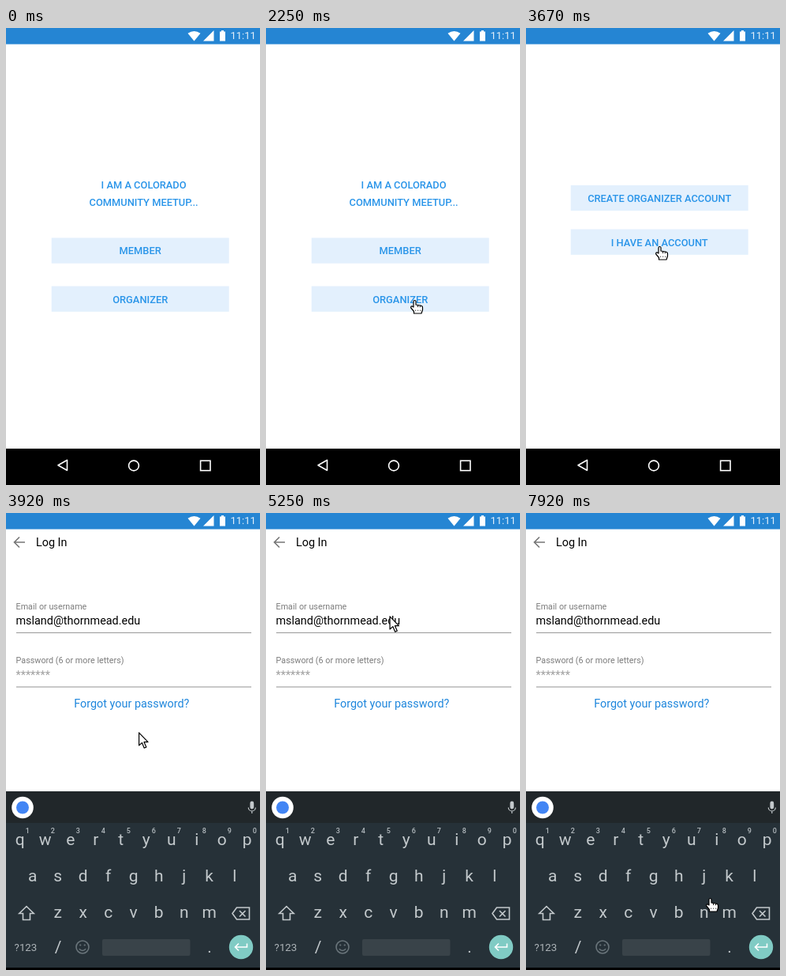
Write an HTML page that moves like this. It is 322 px wide and 578 px high and loops after 8 s.

```html
<!DOCTYPE html>
<html lang="en">
<head>
<meta charset="utf-8">
<title>Log in flow</title>
<style>
  html, body { margin: 0; width: 100%; height: 100%; overflow: hidden; background: #fff; }
  svg { display: block; }
  text { font-family: Roboto, sans-serif; white-space: pre; }
  .mid { text-anchor: middle; }
  .caps { font-size: 12.85px; font-weight: 500; fill: #2a95e9; }
  .button { fill: #e3f0fd; }
  .label { font-size: 10.8px; fill: #7c7c7c; }
  .field { font-size: 14.4px; }
  .key { font-size: 21px; fill: #c3c9cc; }
  .digit { font-size: 9px; font-weight: 500; fill: #b4bbbf; }
  .line { fill: none; stroke-width: 1.6; }
  .cursor { fill: #fff; stroke: #000; stroke-width: 1.2; stroke-linejoin: round; }
</style>
</head>
<body>
<svg width="322" height="578" viewBox="0 0 322 578">
  <rect width="322" height="20.5" fill="#2585d3"/>
  <g fill="#fff">
    <path d="M230.5 6.8Q238.5 1 246.5 6.8L238.5 16.5ZM250 16.5L263.5 3V16.5Z"/>
    <path d="M271 4.5H273V3H276V4.5H278V16.5H271Z"/>
    <text x="284.5" y="14.3" font-size="13" fill="#e4f0fa">11:11</text>
  </g>
  <rect y="532" width="322" height="46"/>
  <g class="line" stroke="#fff">
    <path d="M66 553L77.5 546.5V559.5Z" stroke-linejoin="round"/>
    <circle cx="162" cy="553.5" r="6.4"/>
    <rect x="246.6" y="547.3" width="12.4" height="12.4"/>
  </g>

  <g id="role"></g>
  <g id="account"></g>
  <g id="login">
    <path class="line" d="M24 37H11M17 30.5L10.5 37L17 43.5" stroke="#757575"/>
    <text class="field" x="38" y="41.5">Log In</text>
    <text class="label" x="12.5" y="122">Email or username</text>
    <text class="field" x="12.5" y="141">msland@thornmead.edu</text>
    <text class="label" x="12.5" y="190">Password (6 or more letters)</text>
    <text class="field" x="12.5" y="209.7" fill="#a0a0a0">*******</text>
    <path d="M13 151.5H311" stroke="#999"/>
    <path d="M13 220H311" stroke="#c8c8c8" stroke-width="2"/>
    <text class="field mid" x="159.3" y="245.5" fill="#1e86dc">Forgot your password?</text>

    <rect y="352" width="322" height="40" fill="#21272a"/>
    <rect y="392" width="322" height="183" fill="#263138"/>
    <rect y="575" width="322" height="3"/>
    <circle cx="21" cy="372.5" r="13.8" fill="#fff"/>
    <circle cx="21" cy="372.5" r="8" fill="#4285f4"/>
    <rect x="309.4" y="364.5" width="4.8" height="10" rx="2.4" fill="#c3c9cc"/>
    <path d="M307.3 372.5a4.5 4.5 0 0 0 9 0M311.8 377v3" fill="none" stroke="#c3c9cc" stroke-width="1.2"/>
    <g id="keys"></g>
    <g class="line" stroke="#c3c9cc">
      <path d="M26 497.5L16.8 506.5H21.5V514.5H30.5V506.5H35.2Z"/>
      <path d="M292.5 499H308.5V514H292.5L287 506.5ZM296 503L303.5 510.5M303.5 503L296 510.5"/>
    </g>
    <text x="10.6" y="554" font-size="13.3" fill="#adb4b8">?123</text>
    <g stroke="#69747a" fill="#69747a">
      <circle class="line" cx="97" cy="549" r="8"/>
      <path class="line" d="M92.8 551.3q4.2 4.4 8.4 0"/>
      <circle cx="94.2" cy="546.5" r=".7"/>
      <circle cx="99.8" cy="546.5" r=".7"/>
    </g>
    <rect x="122" y="539" width="111.5" height="21" rx="2" fill="#394349"/>
    <circle cx="298" cy="549" r="15.2" fill="#80cbc4"/>
    <path class="line" d="M305.5 544.5V549H291M295 544.5L290.5 549L295 553.5" stroke="#fff"/>
  </g>

  <path id="arrow" class="cursor" d="M.6 .8V17L4.4 13.6L7.2 20.2L9.8 19.1L7 12.7H12Z"/>
  <g id="hand" class="cursor">
    <path d="M4 9V2a1.5 1.5 0 0 1 3 0V6l6 1q2.5.5 2.5 2.5v3L14 17H4.5v-2.5L.8 10q-.6-2 1.2-2.2z"/>
    <path d="M9.6 6.8v2.2M12.3 7.2v2" stroke-width="1"/>
    <path d="M6.2 13.2h7" stroke-width="1" stroke-dasharray="1 2"/>
  </g>
</svg>
<script>
const $ = id => document.getElementById(id);
const FPS = 12, FRAMES = 96, PITCH = 32;

const mid = (cls, x, y, s) => `<text class="${cls} mid" x="${x}" y="${y}">${s}</text>`;
const row = (cls, x, y, s) => [...s].map((c, i) => mid(cls, x + i * PITCH, y, c)).join('');

const hotspots = [];
function button(screen, x, y, s) {
  const w = 225, h = 32.3;
  hotspots.push({ screen, x, y, w, h });
  $(screen).innerHTML += `<rect class="button" x="${x}" y="${y}" width="${w}" height="${h}"/>` +
    mid('caps', x + w / 2, y + 21, s);
}

$('role').innerHTML = mid('caps', 174.6, 203.3, 'I AM A COLORADO') +
  mid('caps', 174.6, 225, 'COMMUNITY MEETUP...');
button('role', 57.7, 265.4, 'MEMBER');
button('role', 57.7, 326.5, 'ORGANIZER');
button('account', 56.7, 198.8, 'CREATE ORGANIZER ACCOUNT');
button('account', 56.7, 254.5, 'I HAVE AN ACCOUNT');
hotspots.push({ screen: 'login', x: 86, y: 231, w: 146, h: 19 });
hotspots.push({ screen: 'login', x: 0, y: 352, w: 322, h: 226 });

$('keys').innerHTML =
  ['qwertyuiop', 'asdfghjkl', 'zxcvbnm'].map((s, i) =>
    row('key', 161.7 - (s.length - 1) * PITCH / 2, 420 + i * 45.8, s)).join('') +
  row('digit', 27.3, 405, '1234567890') +
  mid('key', 66, 556, '/') + mid('key', 258, 556, '.');

// Pointer moves: first and last step, then where the tip comes to rest
const entry = [640, -210];
const moves = [
  [8, 10, 149, 104], [10, 12, 365, 247], [13, 15, 315, 413], [15, 24, 187, 350],
  [24, 27, 187, 345], [38, 44, 168, 277], [47, 56, 11, 130], [56, 65, 164, 130],
  [66, 71, 146, 189], [72, 73, 103, 187], [73, 74, -20, 215], [78, 85, 11, 203],
  [85, 90, 62, 199], [91, 95, 232, 488],
];

const easeOut = k => 1 - (1 - k) ** 2;

function pointer(step) {
  let [x, y] = entry;
  for (const [first, last, toX, toY] of moves) {
    if (step <= first) break;
    const k = easeOut(Math.min(1, (step - first) / (last - first)));
    x += (toX - x) * k;
    y += (toY - y) * k;
  }
  return [x, y];
}

function show(id, on) { $(id).style.display = on ? '' : 'none'; }

function draw(now) {
  const step = Math.floor(now * FPS / 1000 + 0.05) % FRAMES;
  const screen = step < 33 ? 'role' : step < 47 ? 'account' : 'login';
  for (const id of ['role', 'account', 'login']) show(id, id === screen);

  const [x, y] = pointer(step);
  const over = hotspots.some(h => h.screen === screen &&
    x >= h.x && x <= h.x + h.w && y >= h.y && y <= h.y + h.h);
  show('hand', over);
  show('arrow', !over);
  $('hand').setAttribute('transform', `translate(${x - 4} ${y - 1})`);
  $('arrow').setAttribute('transform', `translate(${x} ${y})`);
}

const start = performance.now();
function tick() {
  draw(performance.now() - start);
  requestAnimationFrame(tick);
}
tick();
</script>
</body>
</html>
```
